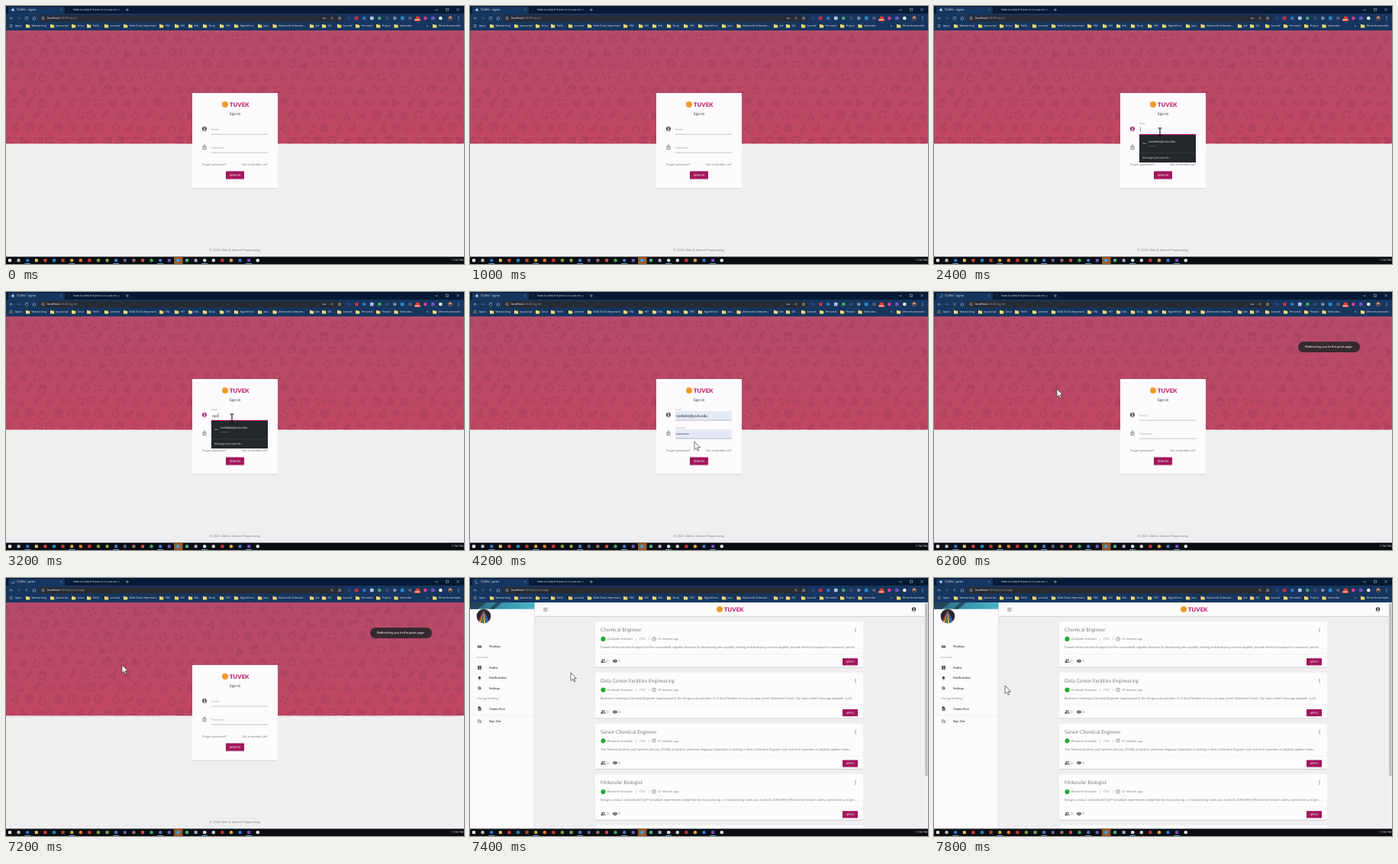
These frames come from a looping animation (600 by 338 pixels, 8 s). An HTML page:

```html
<!DOCTYPE html>
<html lang="en">
<head>
<meta charset="utf-8">
<title>Sign in</title>
<style>
html, body { margin: 0; width: 100%; height: 100%; overflow: hidden; background: #efeef0; }
svg { display: block; width: 600px; height: 338px; }
text { font-family: Lato, "Open Sans", sans-serif; text-rendering: geometricPrecision; white-space: pre; }
.ui text { font-family: "Open Sans", "Noto Sans", sans-serif; }
.off { display: none; }
</style>
</head>
<body>
<svg id="stage" viewBox="0 0 600 338" xmlns="http://www.w3.org/2000/svg"></svg>
<script>
const LOOP = 8000, TICK = 200;
const BRAND = 'TUVEK', MAIL = 'norbeka@uvtx.edu', PINK = '#a3145c';

// markup helpers; text is placed by its vertical middle
const text = (x, y, s, size = 4, fill = '#333', more = '') =>
  `<text x="${x}" y="${y + size * .35}" font-size="${size}" fill="${fill}" ${more}>${s}</text>`;
const rect = (x, y, w, h, fill, r = 0, more = '') =>
  `<rect x="${x}" y="${y}" width="${w}" height="${h}" rx="${r}" fill="${fill}" ${more}/>`;
const dot = (x, y, r, fill, more = '') => `<circle cx="${x}" cy="${y}" r="${r}" fill="${fill}" ${more}/>`;
const line = (d, stroke, w = .6, more = '') =>
  `<path d="${d}" fill="none" stroke="${stroke}" stroke-width="${w}" ${more}/>`;
const group = (id, body, more = '') => `<g id="${id}" ${more}>${body}</g>`;
const ring = (x, y, r) => `M${x - r} ${y}a${r} ${r} 0 1 0 ${2 * r} 0a${r} ${r} 0 1 0 ${-2 * r} 0`;
const middle = 'text-anchor="middle"', thin = 'font-weight="300"', shade = 'filter="url(#shade)"';

// icons on a 24 unit grid: [path, filled]
const icons = {
  user: [ring(12, 12, 10) + ring(12, 8.5, 3.2) + 'M5.5 16.5Q12 10.5 18.5 16.5Q12 22.5 5.5 16.5', 1],
  badge: ['M3 3H21V21H3Z' + ring(12, 9, 3) + 'M6 18Q12 11 18 18Z', 1],
  lock: ['M5 10H19V21H5ZM8 10V6a4 4 0 0 1 8 0V10M12 14V17'],
  people: [ring(8, 8, 3.2) + ring(16, 8, 3.2) + 'M1 19V16Q8 10 15 16V19ZM17 19V15Q21 13 23 17V19Z', 1],
  eye: ['M1 12Q12 -3 23 12Q12 27 1 12Z' + ring(12, 12, 5) + ring(12, 12, 3), 1],
  clock: [ring(12, 12, 9.5) + 'M12 6V12L16 15'],
  bell: ['M4 18Q7 15 6 10Q7 4 12 4Q17 4 18 10Q17 15 20 18ZM10 20H14V22H10ZM1 9L5 3M23 9L19 3', 1],
  gear: [ring(12, 12, 8) + ring(12, 12, 3.5), 1],
  page: ['M5 2H14L20 8V22H5ZM8 13H17V15H8ZM8 17H17V19H8Z', 1],
  list: ['M2 6H22V18H2ZM5 9H11V11H5ZM5 13H11V15H5ZM15 8V16H17V8Z', 1],
  cloud: ['M7 19H18Q23 18 21 13Q18 11 18 11Q16 5 11 6Q7 7 6 11Q1 12 2 16Q4 19 7 19M3 3L21 21'],
  key: [ring(7, 12, 4) + 'M11 12H22V16M18 12V15'],
  zoom: [ring(10, 10, 6) + 'M15 15L22 22'],
  star: ['M12 2L15 9 22 9.5 16.5 14 18.5 21 12 17 5.5 21 7.5 14 2 9.5 9 9Z'],
  back: ['M22 12H3M11 4L3 12L11 20'],
  next: ['M2 12H21M13 4L21 12L13 20'],
  home: ['M2 12L12 3L22 12M5 10V21H19V10'],
  reload: ['M19 7A9 9 0 1 0 21 13M20 2V8H14'],
  stop: ['M4 4L20 20M20 4L4 20'],
};
function icon(name, x, y, size, color, more = '') {
  const [d, solid] = icons[name], k = size / 24;
  const paint = solid ? `fill="${color}" fill-rule="evenodd"` : `fill="none" stroke="${color}" stroke-width="2.2"`;
  return `<path d="${d}" transform="translate(${x - size / 2} ${y - size / 2}) scale(${k})" ${paint} ${more}/>`;
}

function browser() {
  const pale = '#dce4ee';
  let s = rect(0, 0, 600, 11, '#071a35') + rect(3, 1, 74, 10, '#17365f', 2) + rect(0, 10, 600, 22, '#17365f');
  s += text(88, 4.9, 'How to check if port is in use on', 3.85, '#dfe6f0');
  s += dot(82, 5, 1.8, '#16283f');
  for (const x of [72, 147.5]) s += icon('stop', x, 5, 3, '#cdd6e2');
  s += line('M157 5H161M159 3V7M562 5H566M576.5 3.2H579.5V6.2H576.5ZM590.5 3.2L593.5 6.2M593.5 3.2L590.5 6.2', '#d8e0ea', .5);
  s += rect(43, 12, 399, 8.5, '#272b33', 4.2);
  s += icon('back', 7, 16, 5, pale) + icon('next', 17, 16, 5, '#71859f') + icon('home', 37, 16, 5, pale);
  s += icon('reload', 27, 16, 5, pale, 'id="reload"') + icon('stop', 27, 16, 4.5, pale, 'id="halt"');
  s += line(ring(48.5, 16, 2) + 'M48.5 15.6V17.2', '#c4cfdd', .5);
  s += icon('key', 417, 16, 5, pale, 'id="key"') + icon('zoom', 427, 16, 4.5, pale) + icon('star', 437, 16, 5, pale);
  const ext = ['#2c3f78', '#c22f42', '#3f6fb8', '#b6c4de', '#43a860', '#34496b', '#7c8ca4', '#2f86c9', '#5b5876', '#d9442f', '#d8408e', '#6a55b8', '#eef0f4'];
  ext.forEach((c, i) => s += i % 2 ? rect(447 + i * 10, 13.7, 4.5, 4.5, c, .6) : dot(449.3 + i * 10, 16, 2.3, c));
  s += rect(535, 16.5, 8, 3.6, '#d9442f', .8) + text(539, 18.3, 'NEW', 2.7, '#fff', middle + ' font-weight="700"');
  s += dot(582, 16, 3, '#89605d') + dot(582, 15.2, 1.1, '#d8b29c') + rect(580.3, 16.6, 3.4, 1.7, '#28384e', .8);
  for (const y of [14, 16, 18]) s += dot(593, y, .55, '#e4eaf2');
  for (let i = 0; i < 9; i++) s += rect(4.5 + i % 3 * 1.5, 24 + Math.floor(i / 3) * 1.5, 1, 1, ['#e0564a', '#66b36b', '#5794dd'][i % 3]);
  s += text(12, 26.1, 'Apps', 3.6, '#e6ecf4');
  const marks = { Networking: 27, Javascript: 59, Linux: 87, ToDo: 107, Lumora: 130, 'Web-Tools-Important': 155, ISW: 202,
    HCI: 222, Bils: 240, Shop: 259, HPC: 281, Algorithms: 300, Java: 331, 'Advanced Software...': 350.5, Job: 399,
    Git: 415, Laravel: 435, Personal: 459, Project: 486, Interview: 509.5, 'Other bookmarks': 560 };
  for (const [name, x] of Object.entries(marks))
    s += `<path d="M${x - 1} 24h2l.6.7h2.6v3.8h-5.2z" fill="#f6d873"/>` + text(x + 6.4, 26.1, name, 3.6, '#e6ecf4');
  s += text(551, 25.8, '»', 4.5, '#e6ecf4');
  s += dot(9, 5, 1.8, '#b3cbee', 'id="favicon"') + line(ring(9, 5, 2), '#6fb4f5', .8, 'id="spinner" stroke-dasharray="7 6"');
  s += text(14, 4.9, '', 3.8, '#f2f5f9', 'id="tab"');
  s += text(54, 16, '<tspan fill="#fff">localhost</tspan><tspan id="path" fill="#8f96a1"></tspan>', 4);
  return group('browser', s, 'class="ui"');
}

function taskbar() {
  const colors = ['#eef2f5', '#b9bec3', '#2474cf', '#e7c25f', '#d84134', '#2b84d4', '#b8433a', '#d9a53c', '#e87832', '#d4352f',
    '#8f9a3a', '#86a545', '#4c79c9', '#6a5796', '#9b6a6d', '#d5483f', '#3ba760', '#4a76b4', '#6d5cab', '#39a4e2',
    '#42b495', '#b9a7d4', '#dce1e7', '#d5d8dc', '#d63131', '#e1aa31', '#3b76d8', '#7752c4', '#e4e9f0'];
  let s = rect(0, 328.5, 600, 9.5, '#090d12') + rect(220, 328.5, 11.5, 9.5, '#9a5a2a');
  colors.forEach((c, i) => {
    const x = 5 + i * 11.6;
    s += i % 3 ? dot(x, 333.2, 2.2, c) : rect(x - 2, 331.2, 4, 4, c, .5);
    if (i % 5 == 2) s += rect(x - 4, 337.2, 8, .8, '#77b8e8');
  });
  return group('taskbar', s + text(599, 333, '11:58 PM', 3.7, '#f2f4f6', 'text-anchor="end"'), 'class="ui"');
}

function backdrop() {
  const shapes = [
    ring(12, 12, 7) + ring(12, 12, 2) + 'M12 1V5M12 19V23M1 12H5M19 12H23M4 4L7 7M17 17L20 20M20 4L17 7M7 17L4 20',
    'M3 22V14M8 22V9M13 22V12M18 22V3',
    'M3 21L12 3L21 21ZM8 18L12 10L16 18Z',
    ring(12, 14, 8) + 'M12 6Q12 1 17 1',
    'M4 2H20V22H4ZM7 5H17V9H7ZM8 13H10M14 13H16M8 18H10M14 18H16',
    ring(12, 12, 10) + 'M12 5V12L17 15',
    'M2 6H10M6 2V10M14 6H22M3 15L9 21M9 15L3 21M14 16H22M14 20H22',
    'M3 17L17 3L21 7L7 21ZM8 12L10 14M12 8L14 10',
    ring(12, 12, 10) + 'M2 12H22M12 2Q4 12 12 22Q20 12 12 2',
    'M12 3V12H21A9 9 0 1 1 12 3M16 1A8 8 0 0 1 22 8H16Z',
    'M9 2H15M10 2V9L3 21H21L14 9V2M7 15H17',
  ];
  let seed = 17, s = '';
  const rand = () => (seed = seed * 16807 % 2147483647) / 2147483647;
  for (let row = 0; row < 9; row++) for (let col = 0; col < 34; col++) {
    const x = col * 18.5 + row % 2 * 9 - 6 + rand() * 5, y = 34 + row * 16.8 + rand() * 4;
    const n = Math.floor(rand() * 12), turn = Math.floor(rand() * 5) * 15 - 30;
    s += `<g transform="translate(${x} ${y}) rotate(${turn} 7 7) scale(.52)">` +
      (shapes[n] ? `<path d="${shapes[n]}"/>` : '<text x="0" y="19" font-size="20" font-weight="700" fill="#873450" stroke="none">En</text>') + '</g>';
  }
  return rect(0, 32, 600, 297, '#efeef0') + rect(0, 32, 600, 148.4, 'url(#wash)') +
    `<g clip-path="url(#top)" fill="none" stroke="#873450" stroke-width="3" opacity=".27">${s}</g>`;
}

const wordmark = (x, y) => dot(x + 4, y, 4, '#ef9b28') +
  text(x + 10, y, BRAND, 7.6, '#c5256e', 'font-weight="900"');

function field(id, name, glyph, y) {
  return icon(glyph, 260, y - 1, 7, '#555', `id="${id}Icon"`) +
    rect(269, y - 6, 74, 12, '#e5e9f7', 0, `id="${id}Fill"`) +
    text(269.3, y, name, 4, '#aaa', `id="${id}Hint"`) + text(269.3, y - 8, name, 3.1, '#999', `id="${id}Label"`) +
    text(270, y, '', id === 'pass' ? 3.3 : 5, '#222', `id="${id}Value"`) +
    line(`M269 ${y + 6.1}H343`, '#999', .6, `id="${id}Line"`);
}

function signIn() {
  let s = backdrop() + rect(244, 114, 112, 124.5, '#fdfbfe', .8, shade);
  s += wordmark(283, 129) + text(300, 141, 'Sign In', 4.9, '#333', middle);
  s += field('mail', 'Email', 'user', 162) + field('pass', 'Password', 'lock', 186);
  s += rect(0, 158.5, .5, 6.5, '#333', 0, 'id="caret"');
  s += text(257, 207.3, 'Forgot password?', 4.15, '#222', thin) +
    text(343, 207.3, 'Not a member yet?', 4.15, '#222', thin + ' text-anchor="end"');
  s += rect(288, 216.6, 24, 9.9, PINK, .5, 'id="button" ' + shade) + text(300, 221.5, 'SIGN IN', 3.9, '#fff', middle);
  s += line('M240 314.5H360', '#e6e4e7', .5) + text(300, 320, '© 2020. Web &amp; Internet Programming', 4, '#333', middle + ' ' + thin);
  const menu = rect(269, 168.5, 74, 36.5, '#24272b', .6) + rect(269, 169, 74, 23, '#33373d', 0, 'id="choice"') +
    rect(269, 168, 74, .9, PINK) + line('M269 192.5H343', '#43474d', .5) + icon('key', 275.5, 180, 5, '#aebfd5') +
    text(281, 177.5, MAIL, 4, '#f2f2f2') + text(281, 183.8, '•••••••••', 3.2, '#bbb') +
    text(273, 198.8, 'Manage passwords...', 3.9, '#c8cacd');
  s += group('menu', menu, 'class="ui"');
  s += group('toast', rect(477, 65, 81, 14, '#35292f', 7) +
    text(517, 72, 'Redirecting you to the posts page', 4.2, '#fff', middle));
  return group('signin', s);
}

const jobs = [
  ['Chemical Engineer', 'Graduate Assistant', 11, 1, 'Provide timely technical support to the consumable supplies business by developing new supplies, testing and improving current supplies, provide technical support to customers, perfor...'],
  ['Data Center Facilities Engineering', 'Graduate Assistant', 29, 0, 'Brantivo is seeking a Chemical Engineer experienced in the design and operation of Critical Facilities to join our data center Operations team. Our data centers leverage adiabatic cooli...'],
  ['Senior Chemical Engineer', 'Research Assistant', 30, 0, 'The Thermal Systems and Surfaces Division (TSSD) at Eastern Lakeshore Regional Laboratory is seeking a Senior Chemical Engineer with research expertise in catalysis applied chem...'],
  ['Molecular Biologist', 'Research Assistant', 31, 0, 'Design, conduct and interpret GLP-compliant experiments independently for producing or characterizing molecular materials (DNA/RNA/Protein) for biotech safety assessment, and gen...'],
];
function card([title, role, mins, views, about], i) {
  let s = rect(164, 57, 351, 59.6, '#fdfcfd', .8, shade);
  s += text(171, 67.8, title, 6.7, '#222', thin) + dot(174.5, 79.9, 3.1, '#27aa2e');
  s += text(180, 79.8, role, 4.1, '#333', thin) + text(217, 79.8, '|', 4, '#777') + text(222, 79.8, 'CTA', 4, '#333', thin) +
    text(234, 79.8, '|', 4, '#777') + icon('clock', 241, 79.8, 6, '#555') + text(246, 79.8, mins + ' minutes ago', 4.1, '#333', thin);
  s += text(171, 90.8, about, 4.22, '#222', thin) + line('M164 99.5H515', '#e9e7ea', .5);
  s += icon('people', 174.5, 108.7, 7, '#333') + text(179, 108.6, 0, 4.6, '#333', thin) +
    icon('eye', 190, 108.7, 7, '#333') + text(194.5, 108.6, views, 4.6, '#333', thin);
  s += rect(488, 105.2, 20, 9, PINK, .5, shade) + text(498, 109.7, 'APPLY', 3.6, '#fff', middle);
  for (const y of [66, 68, 70]) s += dot(505, y, .6, '#555');
  return `<g transform="translate(0 ${i * 66.7})">${s}</g>`;
}

function posts() {
  let s = rect(0, 32, 600, 297, '#efeef0') + rect(85, 32, 515, 17.8, '#fcfbfc', 0, shade);
  s += line('M96 39.5H101.5M96 41.3H101.5M96 43.1H101.5', '#555', .6) + wordmark(323, 41) + icon('user', 581.5, 41, 6.5, '#333');
  jobs.forEach((j, i) => s += card(j, i));
  s += rect(164, 323.5, 351, 10, '#fdfcfd', .8, shade);
  s += rect(595.5, 32, 4.5, 297, '#f1f1f1') + rect(596, 33, 3.6, 226, '#c1c1c1');
  s += rect(0, 32, 84.5, 297, '#fcfafc') + line('M84.5 32V329', '#d5d3d6', .6) + rect(0, 32, 84.5, 8.7, 'url(#banner)');
  s += '<path d="M0 32H22L10 40.7H0ZM34 32H42L32 40.7H25Z" fill="#20384c" opacity=".7"/>';
  // portrait: coloured beams fanning out on a dark disc
  s += dot(18, 50, 9.3, '#2a2433');
  ['#c8415f', '#e0a83c', '#5aa06a', '#e9cf58', '#3f7fc0', '#8a4a9c'].forEach((c, i) =>
    s += `<path d="M18 42L${8 + i * 3.4} 62H${10.4 + i * 3.4}Z" fill="${c}" clip-path="url(#face)"/>`);
  const items = [['list', 'Postings', 90], ['badge', 'Profile', 117.3], ['bell', 'Notifications', 130.8], ['gear', 'Settings', 144.2],
    ['page', 'Create Post', 171.2], ['cloud', 'Sign Out', 187.4]];
  for (const [glyph, name, y] of items) s += icon(glyph, 12.5, y, 6.2, '#444') + text(25, y, name, 4.1, '#222');
  s += text(9, 104, 'Account', 4, '#555', thin) + text(9, 157.8, 'Manage Postings', 4, '#555', thin);
  return group('posts', s + line('M0 180H84', '#e6e4e7', .5));
}

const pointers = `<g id="pointer">
  <path id="arrow" d="M0 0V10.5L2.5 8.3 4.2 12 5.8 11.3 4.1 7.7H7.5Z" fill="#fff" stroke="#333" stroke-width=".7"/>
  <path id="beam" d="M-2.5 -5H2.5M0 -5V5M-2.5 5H2.5" fill="none" stroke="#111" stroke-width="1.1"/>
  <path id="hand" d="M-1 0Q0 -1 1 0V4L5 5Q6 6 5 11H0L-3 7Q-3 5 -1 7Z" fill="#fff" stroke="#222" stroke-width=".7"/></g>`;

const stage = document.getElementById('stage');
stage.innerHTML = `<defs>
  <linearGradient id="wash" x2="0" y2="1"><stop stop-color="#b34b6b"/><stop offset="1" stop-color="#c14762"/></linearGradient>
  <linearGradient id="banner"><stop stop-color="#2c5870"/><stop offset=".5" stop-color="#3596ae"/><stop offset="1" stop-color="#4fb3c4"/></linearGradient>
  <clipPath id="top"><path d="M0 32H600V180.4H0Z"/></clipPath><clipPath id="face"><circle cx="18" cy="50" r="9.3"/></clipPath>
  <filter id="shade" x="-10%" y="-20%" width="120%" height="150%"><feDropShadow dx="0" dy=".5" stdDeviation=".6" flood-opacity=".28"/></filter>
  </defs>` + signIn() + posts() + browser() + taskbar() + pointers;

const el = {};
stage.querySelectorAll('[id]').forEach(n => el[n.id] = n);
const show = (id, on) => el[id].classList.toggle('off', !on);
const put = (id, s) => { if (el[id].textContent !== s) el[id].textContent = s; };

// time, x, y, shape
const moves = [
  [1400, 65, 227, 'arrow'], [1600, 186, 184, 'arrow'], [1800, 284, 148, 'arrow'], [2200, 296, 165, 'beam'],
  [3600, 295, 176, 'arrow'], [4000, 294, 187, 'arrow'], [4200, 294, 196, 'arrow'], [4400, 297, 207, 'arrow'],
  [4600, 300, 220, 'hand'], [5200, 245, 194, 'arrow'], [5400, 186, 163.5, 'arrow'], [5600, 179, 154, 'arrow'],
  [5800, 172, 144, 'arrow'], [6000, 166, 135, 'arrow'], [6200, 161, 127, 'arrow'], [6400, 157, 120, 'arrow'],
  [6600, 153, 115, 'arrow'], [7000, 152, 114, 'arrow'], [7400, 132, 124, 'arrow'], [7600, 110, 134, 'arrow'], [7800, 93, 141, 'arrow'],
];

function draw(t) {
  const within = (a, b) => t >= a && t < b;
  const focus = within(2400, 3800), filled = within(3800, 5000);
  const loading = within(5200, 7600), moved = t >= 7000, done = t >= 7400;
  show('signin', !done);
  show('posts', done);
  put('tab', `${BRAND} - ${moved ? 'posts' : 'signin'}`);
  put('path', moved ? ':3000/posts/page' : ':3000/signin');
  show('key', !moved);
  show('reload', t < 5200);
  show('halt', t >= 5200);
  show('favicon', !loading);
  show('spinner', loading);
  el.spinner.setAttribute('transform', `rotate(${t * .4} 9 5)`);

  const typed = focus ? MAIL.slice(0, Math.max(0, Math.min(4, (t - 2600) / TICK))) : '';
  put('mailValue', filled ? MAIL : typed);
  put('passValue', filled ? '•••••••••' : '');
  for (const id of ['mail', 'pass']) {
    const up = filled || (focus && id === 'mail');
    show(id + 'Fill', filled);
    show(id + 'Label', up);
    show(id + 'Hint', !up);
  }
  el.mailIcon.setAttribute('fill', focus ? PINK : '#444');
  el.mailLine.setAttribute('stroke', focus ? PINK : '#999');
  show('caret', focus);
  el.caret.setAttribute('x', 270.3 + (typed ? el.mailValue.getComputedTextLength() : 0));
  show('menu', focus);
  show('choice', within(3600, 3800));
  el.button.setAttribute('fill', within(4600, 5800) ? '#b74880' : PINK);
  show('toast', t >= 5200 && !done);

  const m = moves.filter(k => k[0] <= t).pop();
  show('pointer', !!m);
  if (!m) return;
  el.pointer.setAttribute('transform', `translate(${m[1]} ${m[2]})`);
  for (const id of ['arrow', 'beam', 'hand']) show(id, m[3] === id);
}

const start = performance.now();
function frame() {
  const t = (performance.now() - start) % LOOP;
  draw(Math.floor(t / TICK) * TICK);
  requestAnimationFrame(frame);
}
frame();
</script>
</body>
</html>
```
